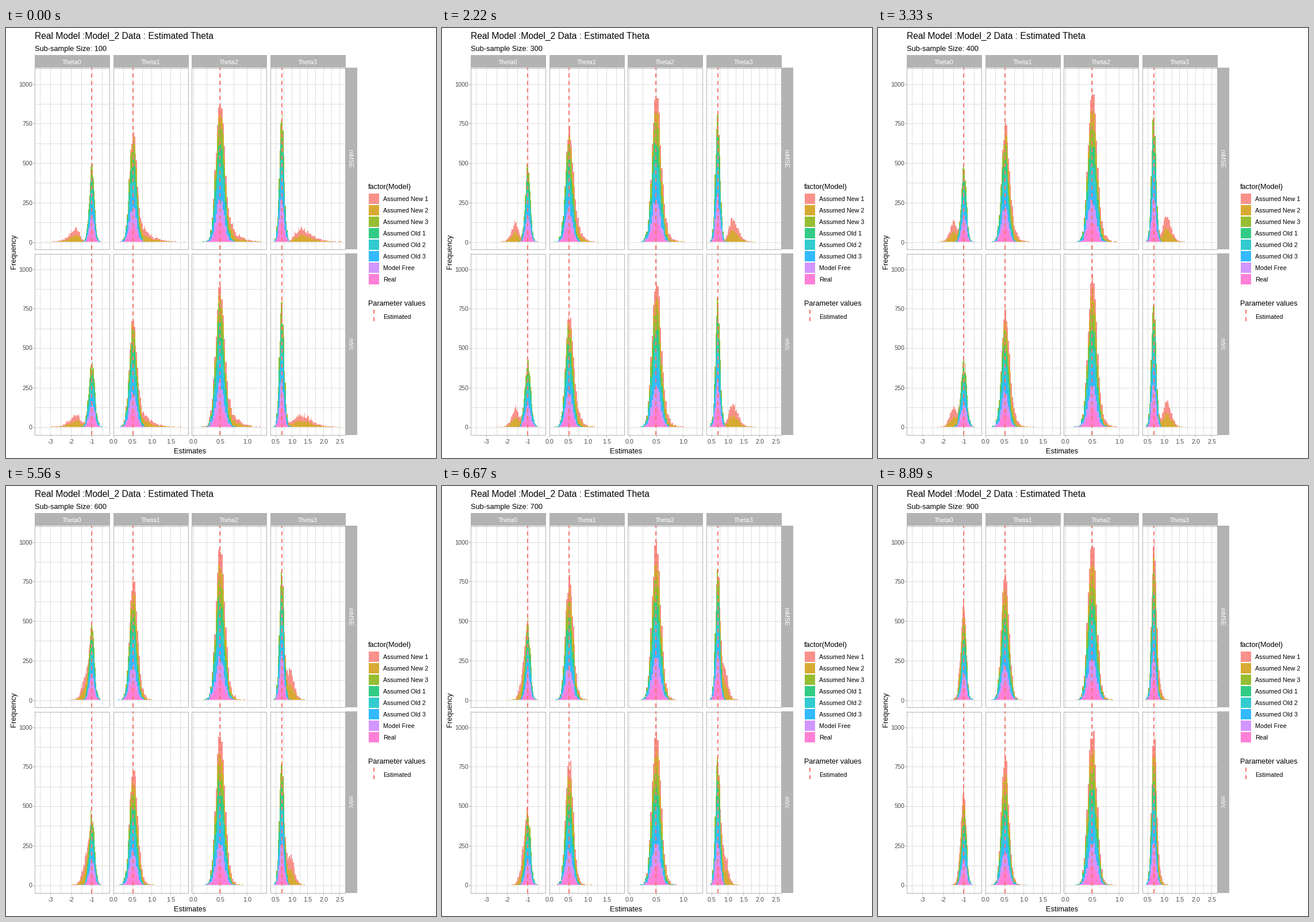
Write a matplotlib script that moves like this. It is 748x748 px and loops after 10000 ms.

```python
import numpy as np
import matplotlib.pyplot as plt
from matplotlib.animation import FuncAnimation
from matplotlib.collections import LineCollection, PolyCollection
from matplotlib.patches import Rectangle

np.random.seed(7)

SIZE, DPI = 748, 88
PX = 72 / DPI                      # points per pixel
LOOP, STEP = 10000, 50
BIN = 0.025
DRAWS = 1000
GREY, GRID, RED = "#B3B3B3", "#DEDEDE", "#F8766D"

MODELS = ["Assumed New 1", "Assumed New 2", "Assumed New 3", "Assumed Old 1",
          "Assumed Old 2", "Assumed Old 3", "Model Free", "Real"]
COLORS = ["#F8766D", "#CD9600", "#7CAE00", "#00BE67",
          "#00BFC4", "#00A9FF", "#C77CFF", "#FF61CC"]
SPREAD = [1, 1, 1.0, 1.03, 1.05, 1.03, 0.95, 0.95]

LEFTS = [50, 187, 323, 460]
WIDTH, HEIGHT = 131, 316
ROWS = [("mMSE", 69, 372), ("mVc", 392, 694)]   # name, panel top, zero line
Y_SCALE = 0.2748

# x = origin + scale * value; tick labels; centre and spread of the main peak;
# mode of the shifted peak (start, change per step); its spread (base, 1/n part)
THETAS = [
    dict(x0=185.7, scale=36, ticks=["-3", "-2", "-1"], minor=0.5, line=149,
         mu=-1.01, sd=(0.125, 0.148), mode=(-1.77, 0.087), wide=(0.12, 0.17), side=-1),
    dict(x0=187.6, scale=66, ticks=["0.0", "0.5", "1.0", "1.5"], minor=0.25, line=221,
         mu=0.505, sd=(0.096, 0.097), mode=(0.66, -0.018), wide=(0.085, 0.15), side=1),
    dict(x0=326.3, scale=93.4, ticks=["0.0", "0.5", "1.0"], minor=0.25, line=372,
         mu=0.495, sd=(0.079, 0.079), mode=(0.55, -0.006), wide=(0.075, 0.10), side=1),
    dict(x0=441.7, scale=55.5, ticks=["0.5", "1.0", "1.5", "2.0", "2.5"], minor=0.25, line=480,
         mu=0.685, sd=(0.074, 0.075), mode=(1.29, -0.0675), wide=(0.075, 0.21), side=1),
]


def draw_samples(theta, row, model, n):
    """Simulated estimates of one model for sub-sample size 100 * n."""
    if model < 2:
        start, slope = theta["mode"]
        base, extra = theta["wide"]
        shape = 3 * n + (6 if row else 1)
        z = (np.random.gamma(shape, size=DRAWS) - (shape - 1)) / np.sqrt(shape)
        return start + slope * (n - 1) + theta["side"] * (base + extra / n) * z
    sd = theta["sd"][row]
    sd += (theta["sd"][0] - sd) * (n - 1) / 10
    return np.random.normal(theta["mu"], sd * SPREAD[model], DRAWS)


def panel_polys(n, row, col):
    """Stacked step outlines of one panel, last model at the bottom."""
    theta = THETAS[col]
    zero = ROWS[row][2]
    lo = (LEFTS[col] + 5 - theta["x0"]) / theta["scale"]
    hi = (LEFTS[col] + WIDTH - 5 - theta["x0"]) / theta["scale"]
    edges = (np.arange(np.ceil(lo / BIN), np.floor(hi / BIN)) - 0.5) * BIN
    xs = np.repeat(theta["x0"] + theta["scale"] * edges, 2)[1:-1]
    bottom = np.zeros(len(edges) - 1)
    polys = []
    for model in reversed(range(len(MODELS))):
        count = np.histogram(draw_samples(theta, row, model, n), edges)[0]
        top = bottom + count
        # even a single count shows as one pixel
        shown = np.where(count > 0, np.maximum(top, 3.7), top)
        up = zero - Y_SCALE * np.repeat(shown, 2)
        down = zero - Y_SCALE * np.repeat(bottom, 2)
        polys.append(np.column_stack([np.r_[xs, xs[::-1]], np.r_[up, down[::-1]]]))
        bottom = top
    return polys


def state_polys(n):
    return [p for row in range(2) for col in range(4) for p in panel_polys(n, row, col)]


fig = plt.figure(figsize=(SIZE / DPI, SIZE / DPI), dpi=DPI, facecolor="white")
ax = fig.add_axes([0, 0, 1, 1])
ax.set(xlim=(0, SIZE), ylim=(SIZE, 0))
ax.axis("off")


def text(x, y, s, size=10.8, color="black", ha="left", rotation=0):
    return ax.text(x, y, s, size=size * PX, color=color, ha=ha, va="baseline",
                   rotation=rotation, rotation_mode="anchor", family="Liberation Sans", zorder=6)


def box(x, y, w, h, color, alpha=1):
    ax.add_patch(Rectangle((x, y), w, h, fc=color, ec="none", alpha=alpha,
                           antialiased=False, zorder=4))


def lines(segments, color, zorder, width=1, style="solid"):
    ax.add_collection(LineCollection(segments, colors=color, linewidths=width * PX,
                                     linestyles=[style], antialiaseds=False,
                                     capstyle="butt", zorder=zorder), autolim=False)


def mid(v):
    return np.floor(v) + 0.5


grid, ticks, borders, marks = [], [], [], []
for row, (name, top, zero) in enumerate(ROWS):
    low = top + HEIGHT
    for col, (left, theta) in enumerate(zip(LEFTS, THETAS)):
        right = left + WIDTH
        for value in range(0, 1001, 125):
            y = mid(zero - Y_SCALE * value)
            grid.append([(left, y), (right, y)])
        for k in range(-10, 20):
            x = mid(theta["x0"] + theta["scale"] * theta["minor"] * k)
            if left <= x < right:
                grid.append([(x, top), (x, low)])
        l, r, t, b = left + 0.5, right - 0.5, top + 0.5, low - 0.5
        borders.append([(l, t), (r, t), (r, b), (l, b), (l, t - 0.5)])
        marks.append([(theta["line"], low), (theta["line"], top)])
        if row == 0:
            box(left, 47, WIDTH, 22, GREY)
            text(left + WIDTH / 2 - 0.5, 63, f"Theta{col}", color="white", ha="center")
        else:
            for label in theta["ticks"]:
                x = mid(theta["x0"] + theta["scale"] * float(label))
                ticks.append([(x, low), (x, low + 3)])
                text(x, 723, label, color="#4D4D4D", ha="center")
    for value in range(0, 1001, 250):
        y = mid(zero - Y_SCALE * value)
        ticks.append([(47, y), (50, y)])
        text(46, y + 4, str(value), color="#4D4D4D", ha="right")
    box(590, top, 21, HEIGHT, GREY)
    text(595, top + HEIGHT / 2, name, color="white", ha="center", rotation=270)

lines(grid, GRID, 1)
lines(ticks, GREY, 4)
lines(borders, GREY, 4)
marks.append([(640, 510), (640, 490)])
lines(marks, RED, 3, 1.8, (0, (3.8, 3.8)))

text(50, 19, "Real Model :Model_2 Data : Estimated Theta", 15.6)
subtitle = text(50, 40, "", 12.8)
text(320, 740, "Estimates", 12.8, ha="center")
text(17.5, 389, "Frequency", 12.8, ha="center", rotation=90)
text(630, 280, "factor(Model)", 12.8)
for k, (name, color) in enumerate(zip(MODELS, COLORS)):
    box(631, 288 + 20 * k, 18, 18, color, 0.8)
    text(656, 301 + 20 * k, name)
text(630, 483, "Parameter values", 12.8)
text(656, 506, "Estimated")

STATES = [state_polys(n) for n in range(1, 10)]
bars = PolyCollection(STATES[0], facecolors=COLORS[::-1], edgecolors="none",
                      alpha=0.8, antialiaseds=False, zorder=2)
ax.add_collection(bars, autolim=False)


def update(i):
    k = (i * STEP + STEP - 1) * len(STATES) // LOOP
    bars.set_verts(STATES[k])
    subtitle.set_text(f"Sub-sample Size: {k + 1}00")
    return bars, subtitle


anim = FuncAnimation(fig, update, frames=LOOP // STEP, interval=STEP,
                     repeat=True, repeat_delay=0, blit=False)
plt.show()
```
